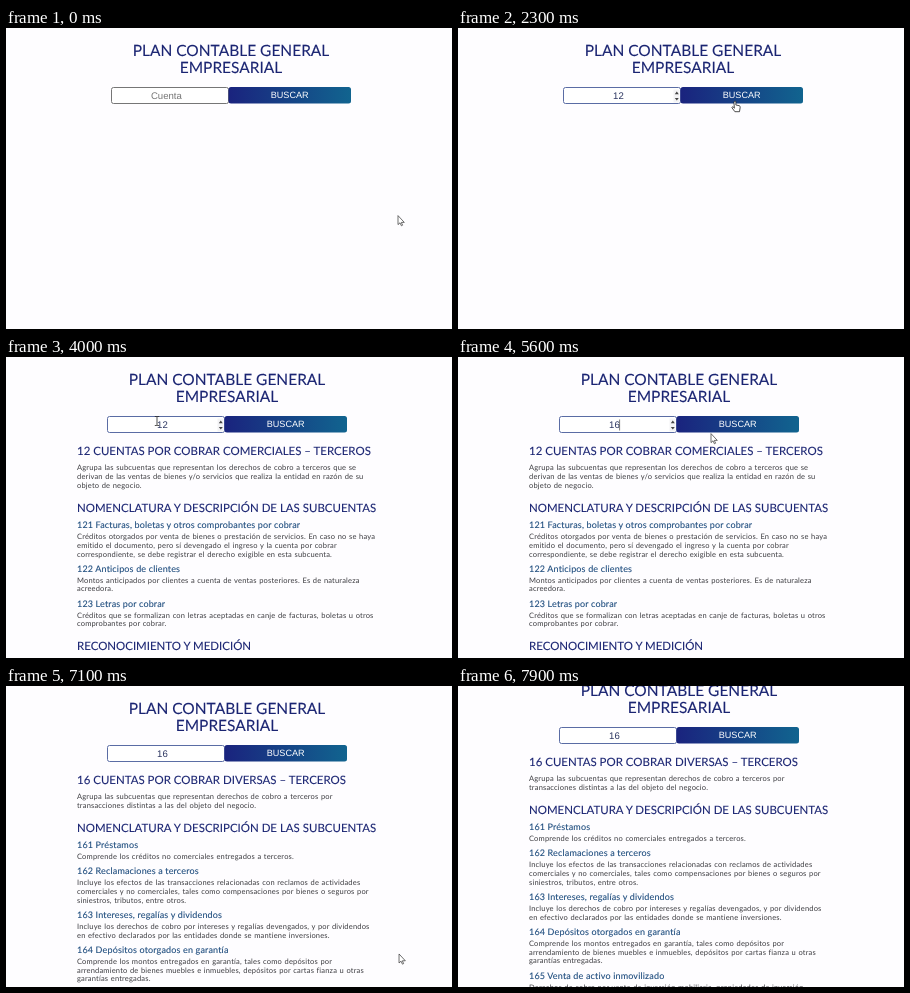
Animation, 446 px wide and 301 px high, one loop 8000 ms. Source, as an HTML page:

```html
<!DOCTYPE html>
<html lang="es">
<head>
<meta charset="utf-8">
<style>
html, body { margin: 0; width: 100%; height: 100%; overflow: hidden; background: #fefdff; }
svg { display: block; width: 446px; height: 301px; }
text { font-family: Lato, "Open Sans", sans-serif; text-rendering: geometricPrecision; white-space: pre; }
.h1, .h2 { fill: #1a2472; stroke: #1a2472; stroke-width: .1; }
.h1 { font-size: 15.5px; text-anchor: middle; }
.h2 { font-size: 11.47px; }
.h3 { font-size: 9px; letter-spacing: .16px; fill: #1b4a7c; stroke: #1b4a7c; stroke-width: .1; }
.p { font-size: 7.5px; letter-spacing: .18px; word-spacing: .4px; fill: #3c3c40; }
.ui { font-family: "Liberation Sans", Arial, sans-serif; text-anchor: middle; font-size: 9.6px; }
</style>
</head>
<body>
<svg viewBox="0 0 446 301">
  <defs>
    <linearGradient id="blue"><stop stop-color="#1a237e"/><stop offset="1" stop-color="#11648f"/></linearGradient>
  </defs>
  <g id="page">
    <g id="form">
      <text class="h1" x="225" y="27.6">PLAN CONTABLE GENERAL</text>
      <text class="h1" x="225" y="45.1">EMPRESARIAL</text>
      <rect id="box" x="105.5" y="59.5" width="117" height="16" rx="2" fill="#fff"/>
      <rect x="222.5" y="59" width="122.5" height="16.5" rx="2.5" fill="url(#blue)"/>
      <text class="ui" x="283.7" y="70.3" fill="#fff" style="font-size:9.1px">BUSCAR</text>
      <rect id="mark" x="155" y="62.5" width="11" height="11" fill="#3390ff"/>
      <text class="ui" id="value" x="160.4" y="71.3"></text>
      <path id="caret" d="M165.6 62.5v11" stroke="#444" stroke-width=".7"/>
      <g id="spin">
        <rect x="215.5" y="61.5" width="6" height="13" fill="#f3f3f5"/>
        <path d="M216.8 66.2l2-2.6 2 2.6zM216.8 70l2 2.6 2-2.6z" fill="#444"/>
      </g>
    </g>
    <g id="r12"></g>
    <g id="r16"></g>
  </g>
  <g id="cursor" stroke-linejoin="round" stroke-linecap="round">
    <path id="arrow" d="M0 0v8.6l2-1.8 1.4 3 1.2-.6-1.3-2.8h2.6z" fill="#fff" stroke="#333" stroke-width=".7"/>
    <path id="hand" d="M-.9.6q.9-1.2 1.8 0v3.4l3.4.7q1 .3.9 1.5l-.7 4.5h-4.6l-3-4q.3-1.4 1.3-.7l.9.9z" fill="#fff" stroke="#222" stroke-width=".8"/>
    <path id="beam" d="M-1.8-4.5h1.3L0-4l.5-.5h1.3M0-4v8M-1.8 4.5h1.3L0 4l.5.5h1.3" fill="none" stroke="#222" stroke-width=".8"/>
  </g>
</svg>
<script>
const $ = id => document.getElementById(id);
const show = (id, on) => $(id).setAttribute("display", on ? "inline" : "none");
const move = (id, x, y) => $(id).setAttribute("transform", `translate(${x} ${y})`);

// "# " is a section, "## " a subaccount, anything else a paragraph with | as line break
const docs = {
  r12: `# 12 CUENTAS POR COBRAR COMERCIALES – TERCEROS
Agrupa las subcuentas que representan los derechos de cobro a terceros que se|derivan de las ventas de bienes y/o servicios que realiza la entidad en razón de su|objeto de negocio.
# NOMENCLATURA Y DESCRIPCIÓN DE LAS SUBCUENTAS
## 121 Facturas, boletas y otros comprobantes por cobrar
Créditos otorgados por venta de bienes o prestación de servicios. En caso no se haya|emitido el documento, pero sí devengado el ingreso y la cuenta por cobrar|correspondiente, se debe registrar el derecho exigible en esta subcuenta.
## 122 Anticipos de clientes
Montos anticipados por clientes a cuenta de ventas posteriores. Es de naturaleza|acreedora.
## 123 Letras por cobrar
Créditos que se formalizan con letras aceptadas en canje de facturas, boletas u otros|comprobantes por cobrar.
# RECONOCIMIENTO Y MEDICIÓN`,
  r16: `# 16 CUENTAS POR COBRAR DIVERSAS – TERCEROS
Agrupa las subcuentas que representan derechos de cobro a terceros por|transacciones distintas a las del objeto del negocio.
# NOMENCLATURA Y DESCRIPCIÓN DE LAS SUBCUENTAS
## 161 Préstamos
Comprende los créditos no comerciales entregados a terceros.
## 162 Reclamaciones a terceros
Incluye los efectos de las transacciones relacionadas con reclamos de actividades|comerciales y no comerciales, tales como compensaciones por bienes o seguros por|siniestros, tributos, entre otros.
## 163 Intereses, regalías y dividendos
Incluye los derechos de cobro por intereses y regalías devengados, y por dividendos|en efectivo declarados por las entidades donde se mantiene inversiones.
## 164 Depósitos otorgados en garantía
Comprende los montos entregados en garantía, tales como depósitos por|arrendamiento de bienes muebles e inmuebles, depósitos por cartas fianza u otras|garantías entregadas.
## 165 Venta de activo inmovilizado
Derechos de cobro por venta de inversión mobiliaria, propiedades de inversión,`
};
// baseline distance from the previous block to the next
const gaps = { h2p: 15.2, h2h3: 16.2, h3p: 10.9, ph3: 15.2, ph2: 24 };

for (const id in docs) {
  let y = 98, prev = "", out = "";
  for (const row of docs[id].split("\n")) {
    const kind = row.startsWith("## ") ? "h3" : row.startsWith("# ") ? "h2" : "p";
    y += gaps[prev + kind] || 0;
    row.replace(/^#+ /, "").split("|").forEach((line, i) => {
      if (i) y += 8.8;
      out += `<text class="${kind}" x="71" y="${y}">${line}</text>`;
    });
    prev = kind;
  }
  $(id).innerHTML = out;
}

// pointer stops: time, x, y
const stops = [
  [0, 392, 188], [100, 392, 191], [800, 158, 68], [1500, 158, 68], [1700, 205, 138],
  [2000, 277, 73], [2900, 277, 73], [3300, 262, 120], [3500, 262, 120], [3900, 151, 64],
  [5200, 151, 64], [5400, 195, 118], [5600, 253, 77], [5800, 256, 73], [6600, 256, 73], [7200, 404, 284]
];
const ease = k => k * k * (3 - 2 * k);
function pointer(t) {
  const i = stops.findIndex(s => s[0] > t);
  if (i < 0) return stops[stops.length - 1].slice(1);
  const [t0, x0, y0] = stops[i - 1], [t1, x1, y1] = stops[i];
  const k = ease((t - t0) / (t1 - t0));
  return [x0 + (x1 - x0) * k, y0 + (y1 - y0) * k];
}

const typed = [[0, ""], [1200, "1"], [1400, "12"], [4800, "1"], [5000, "16"]];
const within = (t, a, b) => t >= a && t < b;

function draw(t) {
  const shift = t >= 2500 ? -4 : 0;
  const scroll = 18 * Math.max(0, (t - 7640) / 260) ** 2;
  move("page", 0, -scroll);
  move("form", shift, 0);
  show("r12", within(t, 2500, 6100));
  show("r16", t >= 6100);

  const text = typed.filter(s => s[0] <= t).pop()[1];
  const marked = within(t, 4300, 4800);
  const focus = within(t, 800, 2400) || within(t, 3900, 5900);
  $("value").textContent = text || "Cuenta";
  $("value").setAttribute("fill", marked ? "#fff" : text ? "#2b3560" : "#757575");
  $("box").setAttribute("stroke", t < 800 ? "#767676" : "#5a6ca4");
  show("mark", marked);
  show("spin", focus);
  show("caret", focus && text && !marked && Math.floor(t / 500) % 2);

  const [x, y] = pointer(t);
  const row = within(y, 59, 76), px = x - shift;
  const beam = row && within(px, 105, 222), hand = row && within(px, 222, 345);
  move("cursor", x, y);
  show("cursor", t < 7300 && !within(t, 1200, 1500) && !within(t, 4800, 5200));
  show("beam", beam);
  show("hand", hand);
  show("arrow", !beam && !hand);
}

// the screen refreshes ten times a second
function tick() {
  draw(Math.floor(performance.now() % 8000 / 100) * 100);
  requestAnimationFrame(tick);
}
tick();
</script>
</body>
</html>
```
